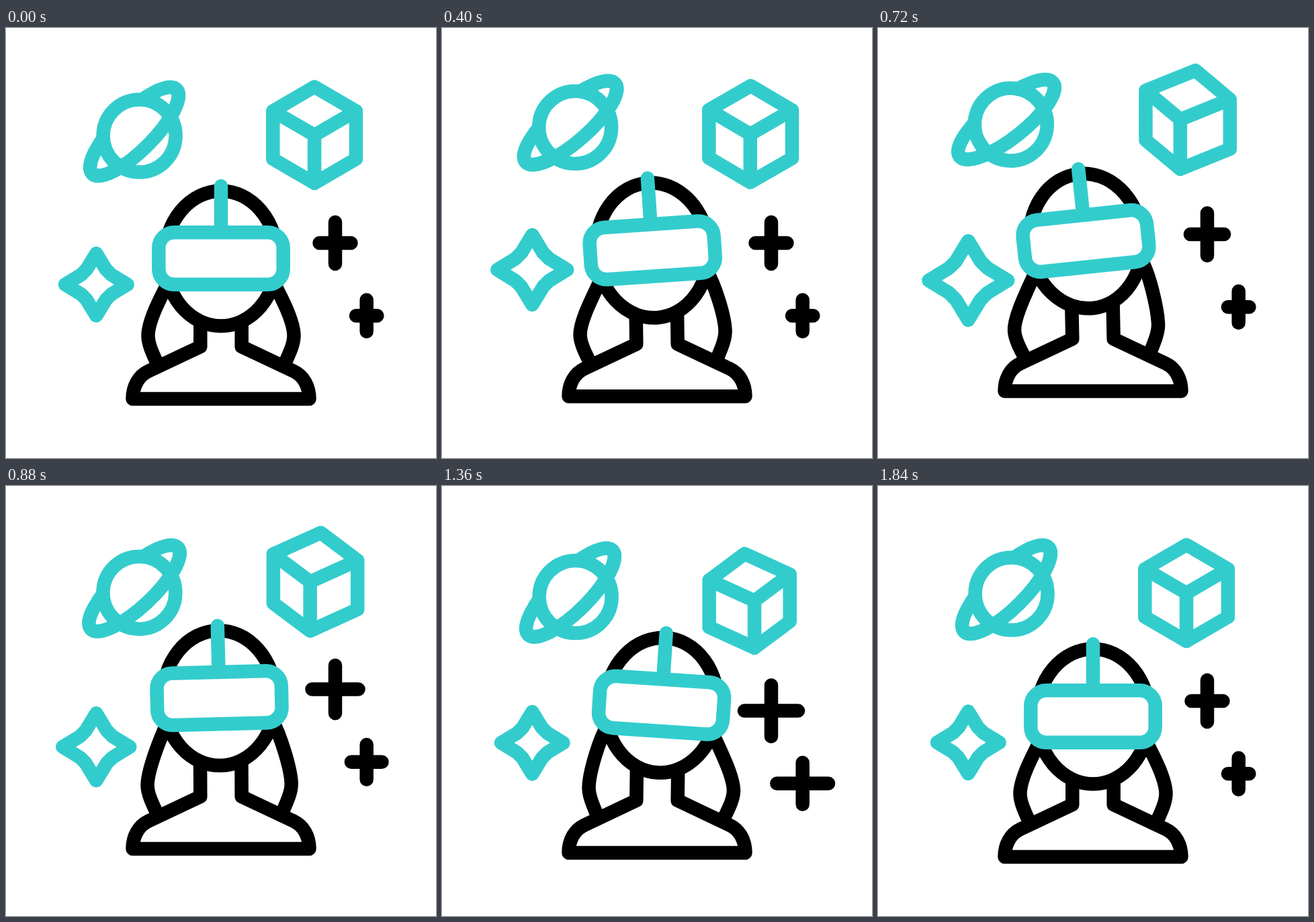
These frames come from a looping animation (640x640 px, 1.88 s). An HTML page with a canvas:

```html
<!DOCTYPE html>
<html lang="en">
<head>
<meta charset="utf-8">
<title>Virtual reality</title>
<style>
html, body { margin: 0; width: 100%; height: 100%; overflow: hidden; background: #fff; }
canvas { display: block; width: 100vw; height: 100vh; }
</style>
</head>
<body>
<canvas id="stage" width="640" height="640"></canvas>
<script>
const ctx = document.getElementById('stage').getContext('2d');
const LOOP = 1880, STEP = 40;
const TEAL = '#33cccc', BLACK = '#000', WHITE = '#fff';
const RAD = Math.PI / 180;

function ease(t, from, to) {
  const u = Math.min(1, Math.max(0, (t - from) / (to - from)));
  return u * u * (3 - 2 * u);
}

// A value that starts at zero and eases through moves of [from, to, goal].
const moves = (...list) => t =>
  list.reduce((v, [from, to, goal]) => v + (goal - v) * ease(t, from, to), 0);

const bodyY = moves([160, 800, -12], [980, 1750, 0]);
const headY = moves([50, 800, -27.4], [1105, 1710, 0]);
const headTurn = moves([20, 660, -6.1], [700, 1110, 5.3], [1170, 1710, 0]);
const planetY = moves([20, 620, -18.7], [680, 1080, 15], [1080, 1520, 0]);
const planetTurn = moves([40, 720, 6.7], [720, 1080, -4.8], [1080, 1360, 0]);
const cubeY = moves([340, 740, -24], [740, 1270, 14], [1280, 1660, 0]);
const cubeTurn = moves([360, 740, 10.3], [740, 1280, -8.3], [1280, 1600, 0]);
const starY = moves([60, 410, -22], [420, 1060, 13.3], [1060, 1400, 0]);
const starGrow = moves([220, 640, .31], [640, 1000, 0]);
const plusY = moves([400, 880, -17.4], [1030, 1400, 15.7], [1440, 1780, 0]);
const bigGrow = moves([640, 1140, 1], [1180, 1680, 0]);
const smallGrow = moves([700, 1200, 1], [1290, 1760, 0]);

// Strokes the path built by draw(), on an optional fill.
function shape(color, fill, draw) {
  ctx.beginPath();
  draw();
  if (fill) {
    ctx.fillStyle = fill;
    ctx.fill();
  }
  ctx.strokeStyle = color;
  ctx.stroke();
}

function poly(points, closed) {
  points.forEach(([x, y], i) => i ? ctx.lineTo(x, y) : ctx.moveTo(x, y));
  if (closed) ctx.closePath();
}

function spin(x, y, cx, cy, deg) {
  const c = Math.cos(deg * RAD), s = Math.sin(deg * RAD);
  return [cx + (x - cx) * c - (y - cy) * s, cy + (x - cx) * s + (y - cy) * c];
}

// The roots follow the head, the ends swing with the shoulders.
function hair(t, side) {
  const turn = headTurn(t), lift = bodyY(t);
  const top = (x, y) => {
    const p = spin(320 + side * x, y, 320, 443, turn);
    return [p[0], p[1] + headY(t)];
  };
  const low = (x, y) => {
    const p = spin(320 + side * (x + .12 * lift), y, 320, 458, turn * .45);
    return [p[0] + turn * 1.65, p[1] + lift * 1.12];
  };
  shape(BLACK, null, () => {
    ctx.moveTo(...top(78, 378));
    ctx.bezierCurveTo(...top(89, 399), ...low(108.5, 436), ...low(108.5, 458));
    ctx.bezierCurveTo(...low(108.5, 472), ...low(100, 488), ...low(92, 506));
  });
}

function body(t) {
  const lean = headTurn(t) * .2;
  ctx.save();
  ctx.translate(0, bodyY(t));
  shape(BLACK, WHITE, () => {
    ctx.moveTo(289.3 + lean, 415);
    ctx.lineTo(289.3, 474.2);
    ctx.lineTo(212, 510.8);
    ctx.bezierCurveTo(197.5, 517.5, 188.5, 533, 188.5, 552);
    ctx.lineTo(451.5, 552);
    ctx.bezierCurveTo(451.5, 533, 442.5, 517.5, 428, 510.8);
    ctx.lineTo(350.7, 474.2);
    ctx.lineTo(350.7 + lean, 415);
  });
  ctx.restore();
}

function head(t) {
  ctx.save();
  ctx.translate(320, 443 + headY(t));
  ctx.rotate(headTurn(t) * RAD);
  ctx.translate(-320, -443);
  shape(BLACK, WHITE, () => ctx.ellipse(320, 343, 84, 100.5, 0, 0, 7));
  shape(TEAL, null, () => poly([[320, 235.3], [320, 300]]));
  shape(TEAL, WHITE, () => ctx.roundRect(227.3, 304.3, 185.4, 77.4, 23));
  ctx.restore();
}

function planet(t) {
  const ring = to => shape(TEAL, null,
    () => ctx.ellipse(0, 0, 88.6, 28.5, -45 * RAD, 0, to));
  ctx.save();
  ctx.translate(191, 154 + planetY(t));
  ctx.rotate(planetTurn(t) * RAD);
  ring(Math.PI * 2);
  shape(TEAL, WHITE, () => ctx.arc(7.6, 6.5, 54, 0, 7));
  ring(Math.PI);
  ctx.restore();
}

// A box seen from above, turning on its upright axis.
function cube(t) {
  const turn = cubeTurn(t), k = 1 + turn * .003;
  const x = 459.1 + turn * .2, y = 123.5 + cubeY(t);
  const corner = deg => [
    x + 61.8 * k * Math.cos((deg + turn) * RAD),
    y + 36 * k * Math.sin((deg + turn) * RAD)
  ];
  const [right, front, left, back] = [0, 90, 180, 270].map(corner);
  const drop = p => [p[0], p[1] + 71.5 * k];
  shape(TEAL, null, () => {
    poly([back, right, drop(right), drop(front), drop(left), left], true);
    poly([left, front, right]);
    poly([front, drop(front)]);
  });
}

function star(t) {
  const k = 1 + starGrow(t), y = 381.8 + starY(t), points = [];
  for (let deg = 0; deg < 360; deg += 90) {
    for (const [dx, dy] of [[0, -46.3], [14.5, -22.5], [22.5, -14.5]]) {
      points.push(spin(134.3 + dx * k, y + dy * k, 134.3, y, deg));
    }
  }
  shape(TEAL, null, () => poly(points, true));
}

function plus(x, y, w, h) {
  shape(BLACK, null, () => {
    poly([[x - w, y], [x + w, y]]);
    poly([[x, y - h], [x, y + h]]);
  });
}

function render(t) {
  const dy = plusY(t), big = bigGrow(t), small = smallGrow(t);
  ctx.fillStyle = WHITE;
  ctx.fillRect(0, 0, 640, 640);
  ctx.lineWidth = 20.5;
  ctx.lineCap = ctx.lineJoin = 'round';
  planet(t);
  cube(t);
  star(t);
  hair(t, -1);
  hair(t, 1);
  body(t);
  head(t);
  plus(490, 320 + dy, 23.5 + 23.5 * big, 31 + 10 * big);
  plus(536.7, 428.2 + dy, 15.7 + 24.1 * small, 23.5 + 8 * small);
}

const start = performance.now();
function tick() {
  const t = Math.floor((performance.now() - start) % LOOP / STEP) * STEP;
  render(t < 80 ? 0 : t);
  requestAnimationFrame(tick);
}
tick();
</script>
</body>
</html>
```
